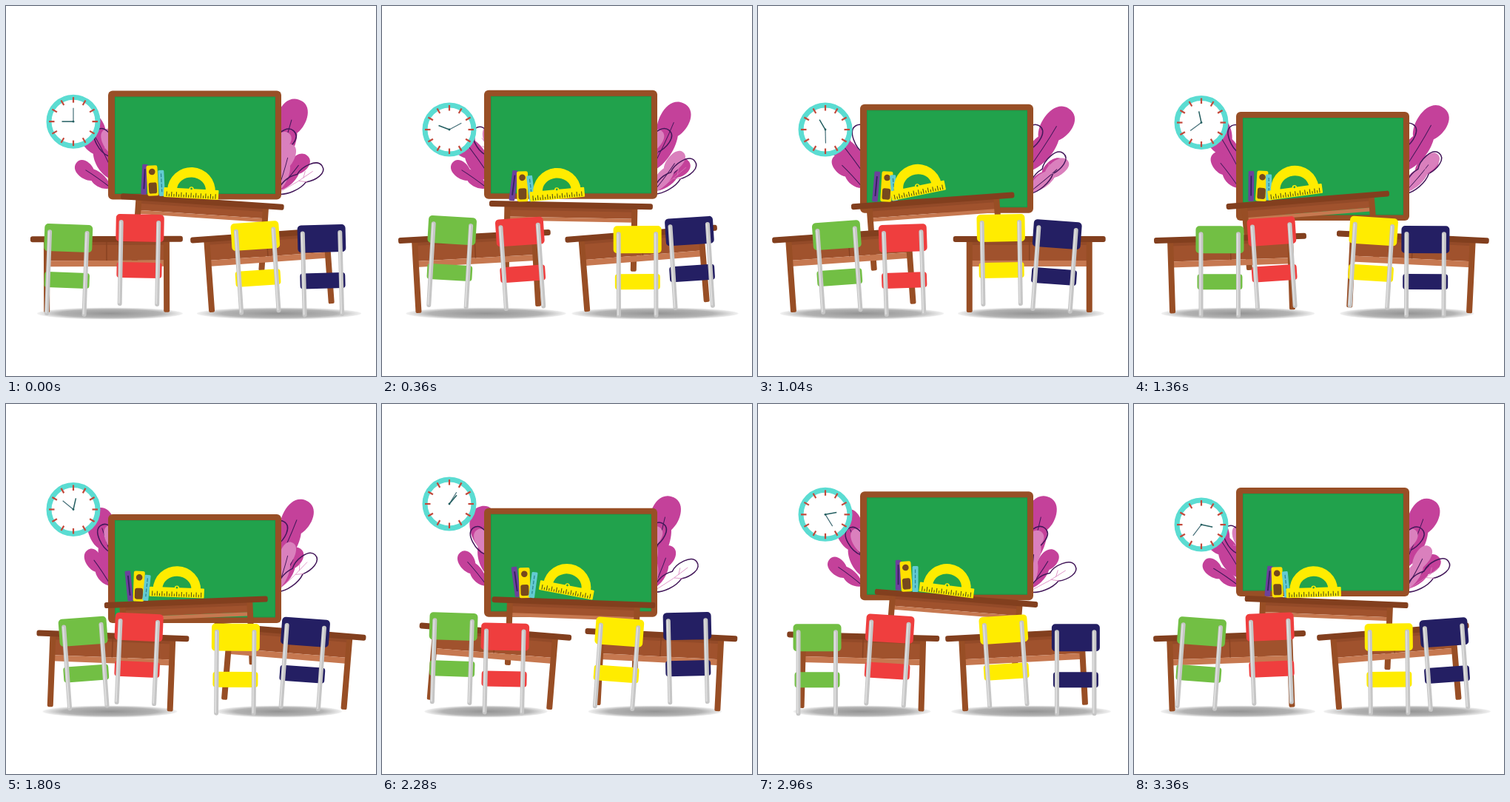
Recreate the animation shown at these times as an HTML page. Size 500x500 px, loop 3400 ms.

```html
<!DOCTYPE html>
<html lang="en">
<head>
<meta charset="utf-8">
<title>Classroom</title>
<style>
html, body { margin: 0; width: 100%; height: 100%; overflow: hidden; background: #fff; }
svg { display: block; width: 100%; height: 100%; }
</style>
</head>
<body>
<svg id="stage" viewBox="0 0 500 500"></svg>
<script>
const LOOP = 3400, STEP = 40, SWAY = 3150, HOP = SWAY / 2;
const { PI, sin, cos, abs, floor } = Math;
const RAD = PI / 180;
// Cosine wave that peaks at time `peak`
const wave = (t, peak, period = SWAY) => cos(2 * PI * (t - peak) / period);

const line = (x1, y1, x2, y2, color, width, extra = '') =>
  `<path d="M${x1} ${y1}L${x2} ${y2}" stroke="${color}" stroke-width="${width}" ${extra}/>`;
const rect = (x, y, w, h, fill, r = 0, extra = '') =>
  `<rect x="${x}" y="${y}" width="${w}" height="${h}" rx="${r}" fill="${fill}" ${extra}/>`;
const group = (id, body) => `<g id="${id}">${body}</g>`;
const each = (n, draw) => Array.from({ length: n }, (_, i) => draw(i)).join('');

const MAGENTA = '#c4419a', PINK = '#da80bd', INK = '#43185a';
const LEAF = 'M0 0C-15-12-17-35-11-48C-22-62-20-100 3-100C24-100 24-72 14-58C19-40 14-14 0 0Z';
const SLIM = 'M0 0C-13-14-17-34-10-52C-18-66-15-100 2-100C19-100 18-74 11-58C17-42 13-14 0 0Z';

// peak: time of the largest angle; angles are in degrees from upright
const leaves = [
  { x: 150, y: 237, size: 1, mid: -26, amp: 15, peak: 2300, fill: MAGENTA },
  { x: 172, y: 230, size: .74, mid: -29, amp: 11, peak: 1000, fill: PINK, slim: 1 },
  { x: 170, y: 230, size: .78, mid: -35, amp: 5, peak: 1150, slim: 1 },
  { x: 142, y: 246, size: .58, mid: -46, amp: 11, peak: 1750, fill: MAGENTA },
  { x: 362, y: 225, size: 1.04, mid: 22, amp: 10, peak: 1050, fill: MAGENTA },
  { x: 333, y: 230, size: .76, mid: 30, amp: 10, peak: 2950, fill: PINK, slim: 1 },
  { x: 335, y: 228, size: .8, mid: 35, amp: 6, peak: 100, slim: 1 },
  { x: 366, y: 250, size: .63, mid: 36, amp: 15, peak: 700, fill: MAGENTA },
  { x: 366, y: 252, size: .68, mid: 22, amp: 28, peak: 900, fill: PINK, slim: 1 },
  { x: 366, y: 254, size: .72, mid: 49, amp: 10.5, peak: 2800, slim: 1 }
];

const chairs = [
  { x: 98, peak: 1380, color: '#72bf44' },
  { x: 181.8, peak: 850, color: '#ef3e3e' },
  { x: 327.5, peak: 310, color: '#ffec00' },
  { x: 411.5, peak: -160, color: '#241f63' }
];

const desks = [
  { x: 136.5, y: 315, peak: 2345, shadowX: 140.5, shadow: 98, shrink: 15 },
  { x: 366.8, y: 315, peak: 1830, shadowX: 369, shadow: 99, shrink: 14 },
  { x: 251.5, y: 269.5, peak: 2840 }
];

const drawLeaf = ({ fill, slim, size }) => {
  const ink = `fill="none" stroke="${INK}" stroke-linecap="round"`;
  const shape = slim ? SLIM : LEAF;
  const body = fill
    ? `<path d="${shape}" fill="${fill}"/><path d="M0 0Q3-40 2-72" ${ink} stroke-width="${1 / size}"/>`
    : `<path d="${shape}" ${ink} stroke-width="${1.5 / size}"/>` +
      `<path d="M0-10Q3-45 1-80M2-48l10-12M2-58l-9-10" fill="none" stroke="${PINK}" stroke-width="1"/>`;
  return `<g transform="scale(${size})">${body}</g>`;
};

function drawDesk(half, legX, legY, panelY, stripY) {
  const width = 2 * legX;
  return rect(-legX, 3, width, panelY - 3, '#a0522d') +
    rect(-legX, 3, width, 5, '#8a4525', 0, 'opacity=".6"') +
    rect(-legX, panelY, width, stripY - panelY, '#c67850') +
    [-legX, legX].map(x => rect(x - 4, 0, 8, legY, '#984e25', 2)).join('') +
    rect(-half, -4, 2 * half, 8, '#823f1e', 3);
}

// Chair origin lies 24 above its feet
const drawChair = color =>
  rect(-32.5, -100, 65, 37, color, 5) + rect(-30.5, -35, 61, 21, color, 4) +
  [-25.5, 25].map(x =>
    line(x, -89, x, 21, '#c6c6c6', 6, 'stroke-linecap="round"') +
    line(x - 1, -89, x - 1, 20, '#dedede', 2, 'stroke-linecap="round"')).join('');

const clock =
  '<circle r="33" fill="#fff" stroke="#5bdcd2" stroke-width="7"/>' +
  each(12, i => line(0, -33, 0, -25.5, '#c4473a', 2.2, `transform="rotate(${i * 30})"`)) +
  line(0, 0, 0, -18.5, '#456f78', 1.2, 'id="minute"') +
  line(0, 0, 0, -15.5, '#235e60', 1.5, 'id="hour"') + '<circle r="1.4" fill="#235e60"/>';

const board = rect(138, 0, 234, 147, '#984f26', 6) + rect(147, 8, 217, 131.5, '#1f9346') +
  rect(148, 9, 215, 129.5, '#21a24c');

const protractor =
  '<path d="M-32.5-3A32.5 32.5 0 0 1 32.5-3L19.5-5A19.5 17 0 0 0-19.5-5Z" fill="#ffec00"/>' +
  rect(-37, -6.5, 74, 13, '#ffec00', 1) +
  '<circle cy="-6" r="3.2" fill="#ffec00"/><circle cy="-6.5" r="1.4" fill="#21a24c"/>' +
  each(21, i => line(-33 + i * 3.3, 5.5, -33 + i * 3.3, i % 2 ? 2 : -1, '#4b4a16', 1));

const sharpener = rect(-7.5, -20.5, 15, 41, '#ffe000', 2.5) +
  '<circle cy="-12" r="4.3" fill="#76491d"/>' + rect(-5.5, 2.5, 11, 15, '#76491d', 3);
const pen = rect(-3.8, -20.5, 7.6, 41, '#6c419c', 1.5) + line(0, -14, 0, 13, '#35205f', 1.8);
const eraser = rect(-4, -17.5, 8, 35, '#63cbd2', 1.5) +
  line(0, -13, 0, 12, '#2c8795', 1.3, 'stroke-dasharray="5 2"');

const stage = document.getElementById('stage');
stage.innerHTML =
  '<defs><radialGradient id="shade"><stop offset="0" stop-opacity=".42"/>' +
  '<stop offset=".7" stop-opacity=".3"/><stop offset="1" stop-opacity=".05"/></radialGradient></defs>' +
  desks.slice(0, 2).map((d, i) =>
    `<ellipse id="shadow${i}" cx="${d.shadowX}" cy="415.5" ry="8" fill="url(#shade)"/>`).join('') +
  leaves.map((leaf, i) => group('leaf' + i, drawLeaf(leaf))).join('') +
  group('board', board) + group('clock', clock) +
  group('desk2', drawDesk(110.5, 86, 88, 17, 22)) +
  group('pen', pen) + group('sharpener', sharpener) + group('eraser', eraser) +
  group('protractor', protractor) +
  [0, 1].map(i => group('desk' + i,
    drawDesk(103, 81, 99, 29, 37) + line(0, 4, 0, 29, '#884322', 1.5))).join('') +
  chairs.map((chair, i) => group('chair' + i, drawChair(chair.color))).join('');

const parts = {};
stage.querySelectorAll('[id]').forEach(node => parts[node.id] = node);
const place = (id, x, y, angle = 0) =>
  parts[id].setAttribute('transform', `translate(${x} ${y}) rotate(${angle})`);

// The tilt swings both ways in a hop and mirrors on the way back
function chairTilt(u) {
  const a = 2 * PI * u / HOP, s = sin(a);
  const eased = cos(a) > 0 ? s * abs(s) : s;
  return -4.2 * eased * (floor(u / HOP) % 2 ? -1 : 1);
}

function update(t) {
  leaves.forEach((leaf, i) =>
    place('leaf' + i, leaf.x, leaf.y, leaf.mid + leaf.amp * wave(t, leaf.peak)));

  place('board', 0, 131 - 18 * wave(t, 205));
  place('clock', 91, 153 + 18 * wave(t, 700));
  parts.minute.setAttribute('transform', `rotate(${t * .1718})`);
  parts.hour.setAttribute('transform', `rotate(${270 + t * .0571})`);

  const poses = desks.map((desk, i) => {
    const c = wave(t, desk.peak);
    const pose = { c, x: desk.x + 17 * c, y: desk.y - 7.5 * c * c, angle: 4.7 * c };
    place('desk' + i, pose.x, pose.y, pose.angle);
    if (desk.shadow) parts['shadow' + i].setAttribute('rx', desk.shadow - desk.shrink * c);
    return pose;
  });

  const top = poses[2];
  const stand = (id, x, rise, angle) =>
    place(id, x, top.y - rise + (x - top.x) * sin(top.angle * RAD), angle);
  const lean = 8 * wave(t, 600);
  stand('pen', 174 + 16 * top.c, 25, lean);
  stand('sharpener', 186.5 + 14 * top.c, 24, -.8 * top.angle);
  stand('eraser', 197.5 + 15.5 * top.c, 21.5, -lean);

  const slide = wave(t, 2730), rock = wave(t, 2500);
  place('protractor', 236.5 + 20.5 * slide, 255 - 3 * slide ** 2 - 3 * rock ** 2, 12 * rock);

  chairs.forEach((chair, i) => place('chair' + i,
    chair.x + 18 * wave(t, chair.peak),
    389.3 + 8 * wave(t, chair.peak, HOP),
    chairTilt(t - chair.peak)));
}

const start = performance.now();
function frame() {
  const t = (performance.now() - start) % LOOP;
  update(floor(t / STEP) * STEP);
  requestAnimationFrame(frame);
}
update(0);
requestAnimationFrame(frame);
</script>
</body>
</html>
```
